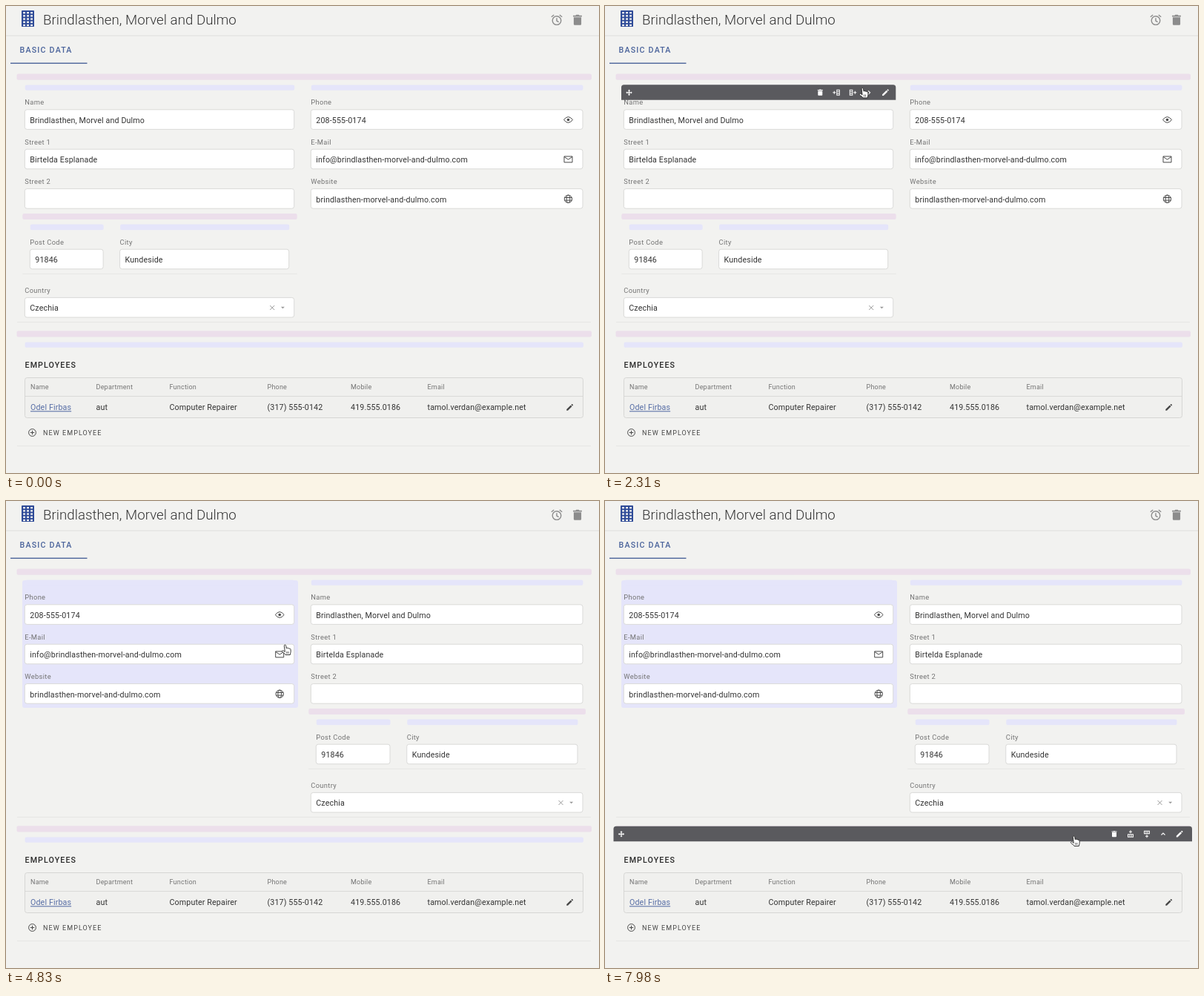
Write an HTML page that moves like this. It is 800 by 630 pixels and loops after 8 s.

```html
<!DOCTYPE html>
<html lang="en">
<head>
<meta charset="utf-8">
<title>Layout editor</title>
<style>
  html, body { margin: 0; width: 100%; height: 100%; overflow: hidden; background: #f2f2f0; }
  svg { display: block; font-family: Roboto, sans-serif; }
  .value { font-size: 10.67px; letter-spacing: .14px; fill: #333; }
  .label { font-size: 9.33px; letter-spacing: .33px; fill: #747474; }
  .head { font-size: 9px; letter-spacing: .22px; fill: #747474; }
  .title { font-size: 18.67px; font-weight: 300; letter-spacing: .04px; fill: #333; }
  .tab, .section { font-size: 10.67px; letter-spacing: 1.2px; font-weight: 500; fill: #4a639b; }
  .section { letter-spacing: 1.1px; fill: #2a2a2a; }
  .button { font-size: 9px; letter-spacing: 1.07px; fill: #484848; }
  .link { fill: #566da5; text-decoration: underline; text-decoration-thickness: .7px; }
  .box { fill: #fff; stroke: #dadad8; }
  .line { fill: none; stroke: #484848; stroke-width: 1; }
</style>
</head>
<body>
<svg id="stage" width="800" height="630" viewBox="0 0 800 630"></svg>
<script>
const LOOP = 8000, STEP = 70;
const COMPANY = 'Brindlasthen, Morvel and Dulmo';
const DOMAIN = 'brindlasthen-morvel-and-dulmo.com';
const PINK = '#ecdfeb', BLUE = '#e5e5fa', BAR = '#5a5a5e', FAINT = '#e6e6e4';
const SIZES = { value: 10.67, label: 9.33, head: 9, title: 18.67, tab: 10.67, section: 10.67, button: 9 };

// Text is placed by its left edge and the middle of its capitals.
const text = (kind, x, cy, content, extra = '') =>
  `<text class="${kind} ${extra}" x="${x}" y="${cy + SIZES[kind] * .355}">${content}</text>`;
const rect = (x, y, w, h, fill, r = 0) =>
  `<rect x="${x}" y="${y}" width="${w}" height="${h}" rx="${r}" fill="${fill}"/>`;
const box = (x, y, w, h) =>
  `<rect class="box" x="${x}" y="${y}" width="${w}" height="${h}" rx="3"/>`;
const rule = (x1, x2, y, color, width = 1) =>
  `<path d="M${x1} ${y}H${x2}" stroke="${color}" stroke-width="${width}"/>`;
const at = (x, y, content, transform = '') =>
  `<g transform="translate(${x} ${y}) ${transform}">${content}</g>`;
const group = (id, content) => `<g id="${id}" visibility="hidden">${content}</g>`;

// Icons are centred on 0,0.
const insert = '<path d="M-5-.5h1.5V-2h1v1.5H-1v1h-1.5V2h-1V.5H-5z"/>' +
  '<path d="M0-4h4.5v8H0zM1-3v1.4h2.5V-3zM1-.7V.7h2.5V-.7zM1 1.6V3h2.5V1.6z" fill-rule="evenodd"/>';
const icon = {
  trash: '<path d="M-3-2.2h6v5.4q0 .8-.8.8h-4.4q-.8 0-.8-.8zM-3.5-3.7h2l.5-.5h2l.5.5h2v1h-7z"/>',
  pencil: '<path d="M-4.2 4.2v-1.7L1.4-3l1.7 1.7-5.6 5.5zM2-3.6l.8-.8q.4-.4.8 0l.8.8q.4.4 0 .8l-.8.8z"/>',
  move: '<path d="M0-4.2L1.6-2.4H.6V-.6h1.8v-1L4.2 0 2.4 1.6v-1H.6v1.8h1L0 4.2-1.6 2.4h1V.6h-1.8v1L-4.2 0l1.8-1.6v1h1.8v-1.8h-1z"/>',
  left: insert,
  right: at(0, 0, insert, 'scale(-1 1)'),
  above: at(0, 0, insert, 'rotate(90)'),
  below: at(0, 0, insert, 'rotate(-90)'),
  next: '<path d="M-1.2-2.5L1.3 0-1.2 2.5" fill="none" stroke="#fff" stroke-width="1.1"/>',
  up: '<path d="M-2.5 1.2L0-1.3 2.5 1.2" fill="none" stroke="#fff" stroke-width="1.1"/>',
  eye: '<path class="line" d="M-6 0Q-3-3.9 0-3.9T6 0Q3 3.9 0 3.9T-6 0z"/><circle r="1.8" fill="#484848"/>',
  mail: '<path class="line" d="M-5.5-4h11v8h-11zM-5.5-3.5L0 .2 5.5-3.5"/>',
  globe: '<g class="line"><circle r="5.2"/><ellipse rx="2.3" ry="5.2"/><path d="M-4.8-1.8h9.6M-4.8 1.8h9.6"/></g>',
  plus: '<g class="line"><circle r="4.9"/><path d="M-2.7 0h5.4M0-2.7v5.4"/></g>',
  alarm: '<g fill="none" stroke="#8c8c8c" stroke-width="1.4"><circle r="5.8" cy=".6"/>' +
    '<path d="M0-2.8V1l2.6 1.6M-7.2-4.2l3.4-2.8M7.2-4.2L3.8-7"/></g>',
};

function field(x, y, w, label, value, decoration = '') {
  return text('label', x, y, label) + box(x, y + 9.8, w, 26.6) +
    text('value', x + 7, y + 24, value) + at(x + w - 19.5, y + 23.5, icon[decoration] || '');
}

function contactColumn(x, w) {
  return rect(x + .5, 106.5, w, 7.2, BLUE, 2) +
    field(x, 130, w, 'Phone', '208-555-0174', 'eye') +
    field(x, 183.4, w, 'E-Mail', 'info@' + DOMAIN, 'mail') +
    field(x, 236.8, w, 'Website', DOMAIN, 'globe');
}

function addressColumn(x, w) {
  const postWidth = w * .272, cityX = x + w * .353, cityWidth = w * .647 - 7;
  return rect(x + .5, 106.5, w, 7.2, BLUE, 2) +
    field(x, 130, w, 'Name', COMPANY) +
    field(x, 183.4, w, 'Street 1', 'Birtelda Esplanade') +
    field(x, 236.8, w, 'Street 2', '') +
    rule(x - 3, x + w + 4, 361.3, FAINT) +
    rect(x - 3, 280, w + 7, 8, PINK, 2) +
    rect(x + 7.5, 294.6, postWidth, 7.6, BLUE, 2) +
    rect(cityX + .5, 294.6, cityWidth, 7.6, BLUE, 2) +
    field(x + 7, 318.4, postWidth, 'Post Code', '91846') +
    field(cityX, 318.4, cityWidth, 'City', 'Kundeside') +
    field(x, 383.6, w, 'Country', 'Czechia') +
    at(x + w - 29.5, 407, '<path d="M-3-3l6 6M3-3l-6 6" stroke="#999"/>') +
    at(x + w - 15.3, 407, '<path d="M-2.5-1.2h5L0 1.3z" fill="#999"/>');
}

function toolbar(x, y, w, names, inset = 14) {
  const buttons = names.map((name, i) =>
    at(x + w - inset - 22 * (names.length - 1 - i), y + 10.5, icon[name])).join('');
  return `<path fill="${BAR}" d="M${x} ${y + 20.5}v-17q0-3.5 3.5-3.5h${w - 7}q3.5 0 3.5 3.5v17z"/>` +
    `<g fill="#fff">${at(x + 10.5, y + 10.5, icon.move)}${buttons}</g>`;
}

function building() {
  let windows = '';
  for (let row = 0; row < 5; row++)
    for (let col = 0; col < 3; col++)
      windows += rect(23.1 + col * 5, 8 + row * 4.2, 2.9, 2.3, '#f2f2f0');
  return rect(21, 6, 17, 22, '#2f4b98', .8) + windows;
}

function employees() {
  const xs = [33, 121.5, 220.5, 352.5, 465, 568.5];
  const heads = ['Name', 'Department', 'Function', 'Phone', 'Mobile', 'Email'];
  const cells = ['Odel Firbas', 'aut', 'Computer Repairer', '(317) 555-0142', '419.555.0186',
    'tamol.verdan@example.net'];
  return text('section', 25.5, 484, 'EMPLOYEES') +
    '<rect x="25.5" y="501.5" width="753" height="54" rx="3" fill="#f0f0ee" stroke="#d6d6d4"/>' +
    rule(26, 778, 526.5, '#dadad8') +
    xs.map((x, i) => text('head', x, 514, heads[i]) +
      text('value', x, 541.5, cells[i], i ? '' : 'link')).join('') +
    at(760.5, 541.5, `<g fill="#484848">${icon.pencil}</g>`) +
    at(35.5, 575.5, icon.plus) + text('button', 50, 575.5, 'NEW EMPLOYEE');
}

const stage = document.getElementById('stage');
stage.innerHTML =
  rect(0, 0, 800, 630, '#f2f2f0') +
  building() + text('title', 50, 18, COMPANY) +
  at(743, 19, icon.alarm) + at(771, 19, `<g fill="#8c8c8c">${icon.trash}</g>`, 'scale(1.7)') +
  rule(0, 800, 40, '#dededc') +
  text('tab', 18.5, 59.3, 'BASIC DATA') + rule(6, 109.5, 77.2, '#566da0', 1.5) +
  rule(15, 789, 426.5, FAINT) + rule(15, 789, 593.5, FAINT) +
  rect(14.5, 91.5, 775.5, 8.3, PINK, 2) + rect(14.5, 438.2, 775.5, 8.3, PINK, 2) +
  rect(25.5, 453.6, 753.5, 7.2, BLUE, 2) +
  group('before', addressColumn(25.3, 363.4) + contactColumn(411.3, 366.7)) +
  group('after', rect(22, 107, 372, 172, BLUE, 3) +
    contactColumn(25.3, 363.4) + addressColumn(411.3, 366.7)) +
  employees() +
  group('employeesBar', toolbar(22, 453, 760, ['trash', 'left', 'right', 'pencil'])) +
  group('columnBar', toolbar(22, 106.3, 370.3, ['trash', 'left', 'right', 'next', 'pencil'])) +
  group('rowBar', rect(22, 453, 760, 9, '#f2f2f0') +
    toolbar(11.5, 438.8, 780.5, ['trash', 'above', 'below', 'up', 'pencil'], 17)) +
  group('arrow', '<path d="M0 0v11l2.5-2.3 1.9 4.3 2-.9-1.9-4.1H8z" stroke="#fff" stroke-width=".8"/>') +
  group('hand', '<path transform="translate(-4.4 0)" fill="#fff" stroke="#222" stroke-width=".9" ' +
    'd="M3.2 1.3c0-1.6 2.1-1.6 2.4 0l.6 3.4c.3-.9 1.7-.8 2 .2.5-.7 1.7-.5 1.9.5.7-.6 1.8-.1 1.9 1' +
    'l.1 3.1c0 1-.9 2.2-.9 4H4.9c-.2-1.7-3-2.4-4.4-4.2-.9-1.2.8-2.1 1.8-1.2l1.9 1.3z"/>' +
    '<path d="M2.3 9v3M4.3 9v3" stroke="#222" stroke-width=".7"/>');

// Pointer tip: time, x, y
const path = [
  [1120, 800, 540], [1260, 457, 591], [1470, 460, 416], [2100, 340, 112], [2590, 358.5, 108],
  [4400, 358.5, 108], [4830, 376.5, 194], [5200, 378, 215], [5700, 381, 356], [7280, 381, 356],
  [7980, 632.5, 452],
];

function pointerAt(t) {
  const next = path.findIndex(point => point[0] > t);
  if (next < 0) return path[path.length - 1].slice(1);
  const [t0, x0, y0] = path[next - 1], [t1, x1, y1] = path[next];
  const u = (t - t0) / (t1 - t0), k = u * u * (3 - 2 * u);
  return [x0 + (x1 - x0) * k, y0 + (y1 - y0) * k];
}

const show = (id, visible) =>
  document.getElementById(id).setAttribute('visibility', visible ? 'visible' : 'hidden');
const between = (t, from, to) => t >= from && t < to;

function draw(t) {
  const swapped = t >= 3990, pointerShown = t > path[0][0];
  const overTarget = between(t, 2030, 5400) || t >= 7560;
  show('before', !swapped);
  show('after', swapped);
  show('employeesBar', between(t, 1330, 1540));
  show('columnBar', between(t, 2030, 3990));
  show('rowBar', t >= 7560);
  show('arrow', pointerShown && !overTarget);
  show('hand', pointerShown && overTarget);
  if (!pointerShown) return;
  const position = `translate(${pointerAt(t).join(' ')})`;
  for (const id of ['arrow', 'hand']) document.getElementById(id).setAttribute('transform', position);
}

const start = performance.now();
function tick() {
  const t = (performance.now() - start) % LOOP;
  draw(Math.floor(t / STEP) * STEP);
  requestAnimationFrame(tick);
}
tick();
</script>
</body>
</html>
```
